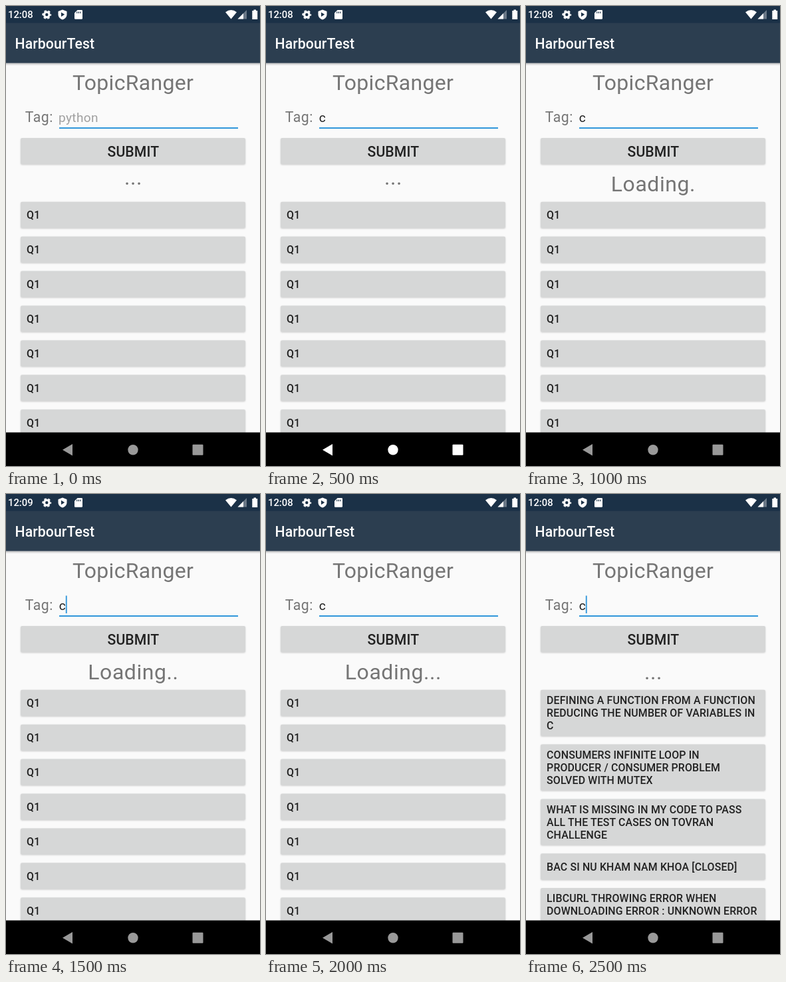
Write an HTML page that moves like this. It is 382 px wide and 690 px high and loops after 3000 ms.

```html
<!DOCTYPE html>
<html lang="en">
<head>
<meta charset="utf-8">
<title>Tag search</title>
<style>
  html, body { margin: 0; width: 100%; height: 100%; overflow: hidden; background: #fafafa; }
  svg { display: block; width: 382px; height: 690px; font-family: Roboto, sans-serif; }
  text { white-space: pre; }

  .status { font: 500 14.85px Roboto, sans-serif; fill: #fff; }
  .bar { font: 500 21.2px Roboto, sans-serif; fill: #fff; letter-spacing: .1px; }
  .head { font-size: 32px; fill: #757575; text-anchor: middle; letter-spacing: .3px; }
  .info { letter-spacing: .55px; }
  .label { font-size: 21.2px; fill: #757575; letter-spacing: .5px; }
  .field { font-size: 19.1px; fill: #212121; letter-spacing: .35px; }
  .hint { fill: #a0a0a0; }
  .submit { font: 500 21.2px Roboto, sans-serif; fill: #212121; text-anchor: middle; letter-spacing: .1px; }
  .row { font: 500 15.9px Roboto, sans-serif; fill: #212121; letter-spacing: .14px; }
  .btn { fill: #d6d7d7; filter: drop-shadow(0 1px 1px rgba(0, 0, 0, .18)); }

  /* Visible for 1, 2 or 5 half-second slots, beginning at slot --k */
  .one, .two, .five {
    visibility: hidden;
    animation: one 3s step-end calc(var(--k, 0) * .5s - 3s) infinite;
  }
  .two { animation-name: two; }
  .five { animation-name: five; }
  @keyframes one { 0% { visibility: visible; } 16.6667%, 100% { visibility: hidden; } }
  @keyframes two { 0% { visibility: visible; } 33.3333%, 100% { visibility: hidden; } }
  @keyframes five { 0% { visibility: visible; } 83.3333%, 100% { visibility: hidden; } }

  .caret { animation: caret 3s step-end -3s infinite; }
  @keyframes caret {
    0%, 66.6667% { visibility: hidden; }
    50%, 83.3333%, 100% { visibility: visible; }
  }
  .nav { fill: #999; animation: nav 3s step-end -3s infinite; }
  @keyframes nav { 0%, 33.3333%, 100% { fill: #999; } 16.6667% { fill: #fff; } }
</style>
</head>
<body>
<svg viewBox="0 0 382 690">
  <defs>
    <linearGradient id="shade" x2="0" y2="1">
      <stop offset="0" stop-opacity=".24"/>
      <stop offset="1" stop-opacity="0"/>
    </linearGradient>
  </defs>
  <rect width="382" height="690" fill="#fafafa"/>
  <rect y="85.6" width="382" height="4" fill="url(#shade)"/>
  <rect width="382" height="85.6" fill="#2c3e50"/>
  <rect width="382" height="25.5" fill="#1b3147"/>

  <g class="status">
    <text class="five" style="--k:4" x="3" y="18.3">12:08</text>
    <text class="one" style="--k:3" x="3" y="18.3">12:09</text>
    <g fill="none" stroke="#fff">
      <circle cx="61.3" cy="13" r="3.8" stroke-width="3.2"/>
      <circle cx="61.3" cy="13" r="6" stroke-width="1.8" stroke-dasharray="3.4 2.883" stroke-dashoffset="1.7"/>
    </g>
    <path d="M85 5.500l6.500 2.600v4.600c0 3.600-2.600 6.400-6.500 7.800c-3.900-1.400-6.500-4.200-6.500-7.800V8.100z"/>
    <path d="M83 9.500v6.500l5.200-3.250z" fill="#1b3147"/>
    <path d="M107.500 6h6.200q1.300 0 1.300 1.300v11.200q0 1.300-1.300 1.300h-9.400q-1.300 0-1.300-1.300V10.400z"/>
    <path d="M106.800 8.500v2.500m2.600-2.500v2.500m2.600-2.500v2.500" stroke="#1b3147" stroke-width="1.2"/>
    <path d="M330 9.200q8.500-6.600 17 0L338.500 19.500z"/>
    <path d="M362 6v13.500h-13.500z" opacity=".35"/>
    <path d="M357 11v8.500h-8.500z"/>
    <path d="M372.500 5.500h3.500v1.500h2.200v13h-7.900v-13h2.200z"/>
  </g>

  <text class="bar" x="13.5" y="64.3">HarbourTest</text>
  <text class="head" x="191" y="126">TopicRanger</text>
  <text class="label" x="28.800" y="174">Tag:</text>
  <text class="field hint one" x="79" y="173.500">python</text>
  <text class="field five" style="--k:1" x="79.800" y="173.500">c</text>
  <rect class="caret" x="89.800" y="152.500" width="1.900" height="26.500" fill="#3498db"/>
  <rect x="80" y="182" width="269" height="2.100" fill="#3498db"/>
  <rect class="btn" x="22" y="198" width="338" height="39.200" rx="2"/>
  <text class="submit" x="191.400" y="225.700">SUBMIT</text>

  <g class="head info">
    <text class="two" x="191.400" y="268">...</text>
    <text class="one" style="--k:2" x="191.400" y="278">Loading.</text>
    <text class="one" style="--k:3" x="191.400" y="278">Loading..</text>
    <text class="one" style="--k:4" x="191.400" y="278">Loading...</text>
    <text class="one" style="--k:5" x="191.400" y="277.500">...</text>
  </g>

  <g id="idle" class="five"></g>
  <g id="found" class="one" style="--k:5"></g>

  <rect y="639.6" width="382" height="50.4"/>
  <g class="nav">
    <path d="M100 657v17.500L85 665.700z"/>
    <circle cx="191" cy="665.700" r="7.700"/>
    <rect x="280.500" y="657.700" width="16" height="16" rx="1"/>
  </g>
</svg>
<script>
  const LINE = 19.1, GAP = 12.7;

  // Stack one button per entry; a button grows with its number of lines
  function fill(id, entries) {
    let y = 293.8, out = "";
    for (const lines of entries) {
      const n = lines.length;
      const h = n > 1 ? n * LINE + 11.8 : 39.2;
      const base = y + h / 2 - (n - 1) * LINE / 2 + 5.75;
      out += `<rect class="btn" x="22" y="${y}" width="338" height="${h}" rx="2"/>`;
      lines.forEach((s, i) => {
        out += `<text class="row" x="31.1" y="${base + i * LINE}">${s}</text>`;
      });
      y += h + GAP;
    }
    document.getElementById(id).innerHTML = out;
  }

  fill("idle", Array(7).fill(["Q1"]));
  fill("found", [
    ["DEFINING A FUNCTION FROM A FUNCTION", "REDUCING THE NUMBER OF VARIABLES IN", "C"],
    ["CONSUMERS INFINITE LOOP IN", "PRODUCER / CONSUMER PROBLEM", "SOLVED WITH MUTEX"],
    ["WHAT IS MISSING IN MY CODE TO PASS", "ALL THE TEST CASES ON TOVRAN", "CHALLENGE"],
    ["BAC SI NU KHAM NAM KHOA [CLOSED]"],
    ["LIBCURL THROWING ERROR WHEN", "DOWNLOADING ERROR : UNKNOWN ERROR", ""]
  ]);
</script>
</body>
</html>
```
